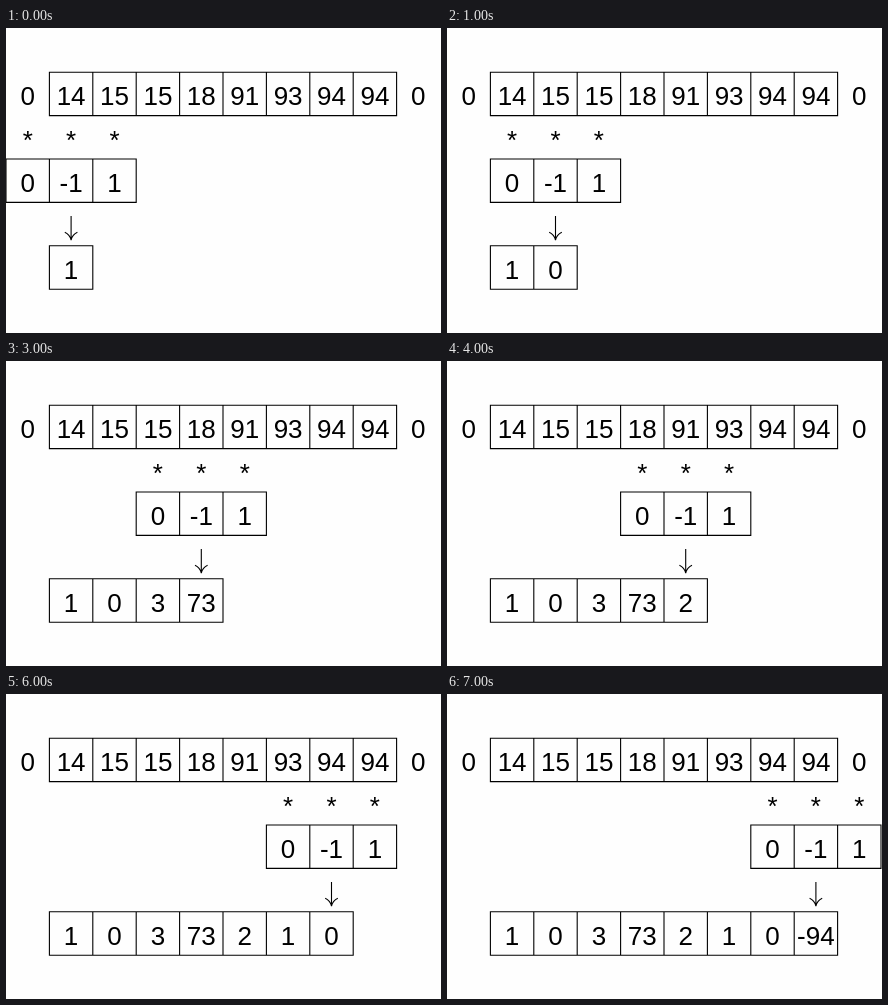
An HTML page for the animation above (8000 ms loop, 435 by 305 pixels).

```html
<!DOCTYPE html>
<html lang="en">
<head>
<meta charset="utf-8">
<title>Sliding kernel</title>
<style>
  html, body { margin: 0; width: 100%; height: 100%; overflow: hidden; background: #fefefe; }
  svg { display: block; width: 435px; height: 305px; }
  text { font: 26px "Liberation Sans", Arial, sans-serif; text-anchor: middle; fill: #000; }
  path { fill: none; stroke: #000; stroke-width: 1.1; }
</style>
</head>
<body>
<svg id="stage" viewBox="0 0 435 305"></svg>
<script>
(() => {
  const CELL = 43.4, TOP = 44.2, STEP_MS = 1000;
  const ROW = { input: 0, star: 1, kernel: 2, output: 4 };
  const input = [0, 14, 15, 15, 18, 91, 93, 94, 94, 0];
  const kernel = [0, -1, 1];
  const steps = input.length - 2;
  const output = Array.from({ length: steps }, (_, i) =>
    kernel.reduce((sum, k, j) => sum + k * input[i + j], 0));
  const svg = document.getElementById("stage");

  const edgeX = col => col * CELL;
  const midX = col => edgeX(col + 0.5);
  const rowY = row => TOP + row * CELL;

  const labels = (values, col, row) => values.map((v, i) =>
    `<text x="${midX(col + i)}" y="${rowY(row) + 33}">${v}</text>`).join("");

  function boxes(col, count, row) {
    const x1 = edgeX(col), x2 = edgeX(col + count);
    const y1 = rowY(row), y2 = rowY(row + 1);
    let d = `M${x1} ${y1}H${x2}V${y2}H${x1}Z`;
    for (let i = 1; i < count; i++) d += `M${edgeX(col + i)} ${y1}V${y2}`;
    return `<path d="${d}"/>`;
  }

  const arrow = col =>
    `<path transform="translate(${midX(col)} 188)"
       d="M0 0V23.5M-6.3 16.2Q-1.3 18.5 0 24Q1.3 18.5 6.3 16.2"/>`;

  function draw(step) {
    svg.innerHTML =
      boxes(1, steps, ROW.input) + labels(input, 0, ROW.input) +
      labels(kernel.map(() => "*"), step, ROW.star) +
      boxes(step, kernel.length, ROW.kernel) + labels(kernel, step, ROW.kernel) +
      arrow(step + 1) +
      boxes(1, step + 1, ROW.output) + labels(output.slice(0, step + 1), 1, ROW.output);
  }

  let shown = -1;
  const start = performance.now();
  function tick() {
    const step = Math.floor((performance.now() - start) / STEP_MS) % steps;
    if (step !== shown) draw(shown = step);
    requestAnimationFrame(tick);
  }
  tick();
})();
</script>
</body>
</html>
```
